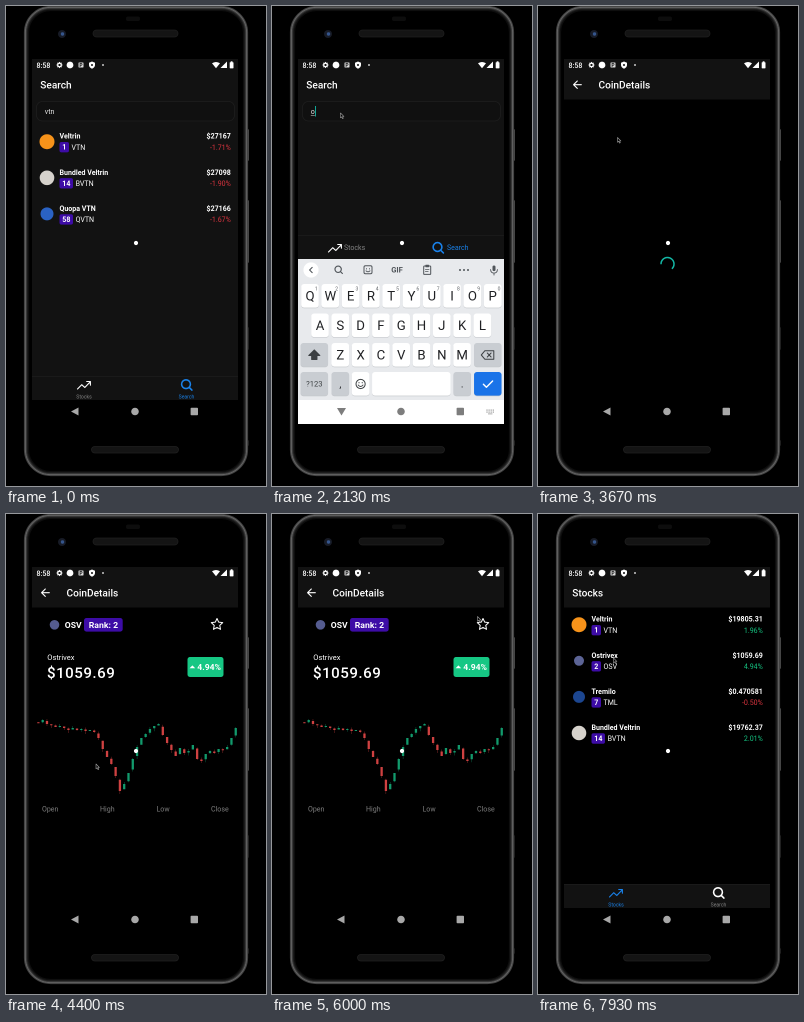
An HTML page with a canvas for the animation above (8 s loop, 260 by 480 pixels).

```html
<!DOCTYPE html>
<html lang="en">
<head>
<meta charset="utf-8">
<title>Coin tracker</title>
<style>
html, body { margin: 0; width: 100%; height: 100%; overflow: hidden; background: #000; }
canvas { display: block; width: 260px; height: 480px; }
</style>
</head>
<body>
<canvas></canvas>
<script>
const LOOP = 8000, W = 260, H = 480;
const CARD = '#121212', BLUE = '#1a82ea', PURPLE = '#3d0ca6', GREEN = '#16c784', RED = '#dd3540', TEAL = '#14b8a6';
const ratio = Math.max(2, window.devicePixelRatio || 1);

function makeContext(canvas) {
  canvas.width = W * ratio;
  canvas.height = H * ratio;
  const c = canvas.getContext('2d');
  c.scale(ratio, ratio);
  return c;
}
const main = makeContext(document.querySelector('canvas'));
const buffer = makeContext(document.createElement('canvas'));
let g = main;

// ---- timing helpers ----
const seg = (t, a, b) => Math.min(1, Math.max(0, (t - a) / (b - a)));
const ease = p => p * p * (3 - 2 * p);
function follow(t, keys) {
  let i = keys.findIndex(k => k[0] > t);
  if (i < 0) i = keys.length - 1;
  const [t0, x0, y0] = keys[i - 1], [t1, x1, y1] = keys[i];
  const p = ease(seg(t, t0, t1));
  return [x0 + (x1 - x0) * p, y0 + (y1 - y0) * p];
}

// ---- drawing helpers ----
function box(x, y, w, h, r, fill, stroke, width = 1) {
  g.beginPath();
  g.roundRect(x, y, w, h, r);
  if (fill) { g.fillStyle = fill; g.fill(); }
  if (stroke) { g.strokeStyle = stroke; g.lineWidth = width; g.stroke(); }
}
const disc = (x, y, r, fill, stroke, width) => box(x - r, y - r, 2 * r, 2 * r, r, fill, stroke, width);
function shape(d, x, y, fill, stroke, width = 1) {
  const path = new Path2D(d);
  g.save();
  g.translate(x, y);
  g.lineJoin = g.lineCap = 'round';
  if (fill) { g.fillStyle = fill; g.fill(path); }
  if (stroke) { g.strokeStyle = stroke; g.lineWidth = width; g.stroke(path); }
  g.restore();
}
function text(s, x, y, size, color = '#fff', weight = 400, align = 'left', spacing = 0) {
  g.font = `${weight} ${size}px Roboto, sans-serif`;
  g.letterSpacing = spacing + 'px';
  g.textAlign = align;
  g.fillStyle = color;
  g.fillText(s, x, y);
  return g.measureText(s).width;
}
function layer(alpha, dy, draw) {
  if (alpha <= 0) return;
  buffer.clearRect(0, 0, W, H);
  g = buffer;
  draw();
  g = main;
  g.globalAlpha = alpha;
  g.drawImage(buffer.canvas, 0, dy, W, H);
  g.globalAlpha = 1;
}

// ---- phone ----
function phone() {
  for (const [y, h] of [[123, 32], [194, 63], [321, 23], [434, 6]]) {
    box(240.3, y, 2.4, h, 1, h > 30 ? '#6a6a6a' : '#2c2c2c');
  }
  box(18.5, 0.5, 223, 469, 26, '#000');
  [64, 100, 58, 30, 14].forEach((v, i) => {
    box(18.5 + i, 0.5 + i, 223 - 2 * i, 469 - 2 * i, 26 - i, null, `rgb(${v},${v},${v})`, 1.2);
  });
  box(120, 10.5, 14, 4.5, 2, '#0d0d0d');
  box(87, 24, 85, 7, 3.5, '#141414', '#1f1f1f', 0.8);
  box(85.5, 440.5, 87, 6.5, 3.2, '#141414', '#202020', 0.8);
  disc(56, 28, 4, '#171b26');
  disc(56.5, 28, 1.7, '#35558c');
}

function statusBar() {
  text('8:58', 30.5, 61.8, 7, '#fff', 500);
  disc(53.5, 59, 1.8, null, '#fff', 1.3);
  for (let i = 0; i < 8; i++) {
    const a = i * Math.PI / 4;
    disc(53.5 + 2.6 * Math.cos(a), 59 + 2.6 * Math.sin(a), 0.5, '#fff');
  }
  disc(64, 59, 3.4, '#fff');
  box(72.5, 56.5, 5, 5, 0.6, '#ddd');
  text('P', 75, 61, 5, CARD, 700, 'center');
  shape('M0-3.5L3-2.3V0Q3 2.6 0 3.7Q-3 2.6-3 0V-2.3Z', 86, 59, '#fff');
  disc(86, 59, 1, CARD);
  disc(97, 59, 0.9, '#fff');
  shape('M-4-2Q0-4.6 4-2L0 3Z', 210, 59.3, '#fff');
  shape('M3-3.5V3H-3.5Z', 218, 59, '#fff');
  box(223.7, 56.2, 3.8, 6.2, 0.6, '#fff');
  box(224.7, 55.3, 1.8, 1.2, 0, '#fff');
}

function navBar() {
  box(26, 394, 207, 24, 0, '#000');
  shape('M3.5-4V4L-4 0Z', 69, 405.5, '#a8a8a8');
  disc(129, 405.5, 3.8, '#a8a8a8');
  box(184.6, 401.8, 7.4, 7.4, 0.8, '#a8a8a8');
}

// ---- app parts ----
const trendIcon = (x, y, color) => shape('M-6.5 4L-2.3-.3L.8 2.5L6.3-3.3M2.7-3.5H6.4V.2', x, y, null, color, 1.1);
function searchIcon(x, y, color, size = 1) {
  disc(x - 0.5 * size, y - 0.5 * size, 4.4 * size, null, color, 1.6 * size);
  shape(`M${2.8 * size} ${2.8 * size}L${5.4 * size} ${5.4 * size}`, x, y, null, color, 1.6 * size);
}
function tabBar(top, active, wide) {
  box(26, top, 207, 24, 0, CARD);
  box(26, top, 207, 0.5, 0, '#222');
  const icon = i => i === active ? BLUE : '#fff', label = i => i === active ? BLUE : '#858585';
  if (wide) {
    trendIcon(63, top + 13, icon(0));
    text('Stocks', 72, top + 15, 7, label(0));
    searchIcon(166, top + 12.5, icon(1));
    text('Search', 175, top + 15, 7, label(1));
  } else {
    trendIcon(78, top + 9, icon(0));
    text('Stocks', 78, top + 22.7, 5.1, label(0), 400, 'center');
    searchIcon(180.5, top + 8.7, icon(1));
    text('Search', 180.5, top + 22.7, 5.1, label(1), 400, 'center');
  }
}
function header(title, x, body) {
  box(26, 53, 207, 365, 0, body);
  box(26, 53, 207, 40.5, 0, CARD);
  statusBar();
  text(title, x, 82.6, 10.1, '#fff', 500);
}
function coinRow([name, ticker, rank, price, change, color, r], y) {
  disc(41, y + 3, r, color);
  text(name, 53.5, y, 7.05, '#fff', 700);
  box(53.5, y + 3.3, String(rank).length * 4 + 5.5, 10.4, 2, PURPLE);
  const w = text(rank, 56.3, y + 11, 7.05, '#fff', 700);
  text(ticker, 61.5 + w, y + 11.2, 7.05);
  text('$' + price, 224.8, y, 7.05, '#fff', 700, 'right');
  text(change.toFixed(2) + '%', 224.8, y + 11.2, 7.05, change < 0 ? RED : GREEN, 400, 'right');
}
const coinList = (rows, y) => rows.forEach((row, i) => coinRow(row, y + i * 36.1));

const veltrinResults = [
  ['Veltrin', 'VTN', 1, '27167', -1.71, '#f7931a', 7.5],
  ['Bundled Veltrin', 'BVTN', 14, '27098', -1.90, '#d6d2cc', 7.3],
  ['Quopa VTN', 'QVTN', 58, '27166', -1.67, '#2a62c4', 6.5],
];
const ostriResults = [
  ['Ostrivex', 'OSV', 2, '1422.93', -0.80, '#565a70', 5],
  ['Dostri', 'DOST', 3, '1.44', -0.59, '#26a17b', 7],
  ['Kavo Pooled Ostri', 'KPOSV', 18, '1331.26', -0.86, '#5cb8ea', 7.5],
  ['Ostrivex Vintage', 'OVV', 30, '20.27', 4.32, '#22803a', 5.5],
  ['Dostri Gilt', 'DOSG', 83, '2678.25', -0.51, '#a88a52', 7],
];
const watchlist = [
  ['Veltrin', 'VTN', 1, '19805.31', 1.96, '#f7931a', 7.5],
  ['Ostrivex', 'OSV', 2, '1059.69', 4.94, '#5c6496', 5],
  ['Tremilo', 'TML', 7, '0.470581', -0.50, '#1c4690', 6],
  ['Bundled Veltrin', 'BVTN', 14, '19762.37', 2.01, '#d6d2cc', 7.3],
];

// ---- screens ----
const keyboardOpen = t => t > 690 && t < 3230;
function query(t) {
  if (t < 1280) return 'vtn';
  return 'ostri'.slice(0, [2050, 2230, 2400, 2560, 2710].filter(at => t >= at).length);
}
function caretOn(t) {
  return keyboardOpen(t) && (t < 900 || (t > 1270 && t < 1470) || t > 1800);
}

function searchScreen(t) {
  header('Search', 34.3, CARD);
  box(30.5, 95.5, 198, 19.5, 6, '#101010', '#1f1f1f', 0.8);
  const typed = query(t), w = text(typed, 38.8, 108, 7.05, '#e8e8e8');
  if (keyboardOpen(t) && typed) box(38.8, 109.4, w, 0.5, 0, '#ddd');
  if (caretOn(t)) box(39 + w, 100, 0.9, 10.5, 0, TEAL);
  if (t < 1280) coinList(veltrinResults, 132.7);
  else if (t > 2750) {
    g.save();
    g.beginPath();
    g.rect(26, 116, 207, keyboardOpen(t) ? 113 : 254);
    g.clip();
    coinList(ostriResults, 132.7);
    g.restore();
  }
  tabBar(keyboardOpen(t) ? 229 : 370, 1, t > 690 && t < 3700);
}

function stocksScreen() {
  header('Stocks', 34.3, '#000');
  coinList(watchlist, 107.7);
  tabBar(370, 0, false);
}

const levels = [208, 209, 206, 210, 211, 213, 212, 214, 216, 214, 216, 215, 217, 216, 218, 224, 235, 243, 250, 262, 277, 270, 259,
  245, 233, 224, 220, 215, 212, 210, 221, 229, 236, 242, 234, 239, 237, 231, 245, 247, 240, 237, 239, 235, 236, 233, 224, 214];
const STEP = 4.29, FIRST = 32.4;
const candles = levels.slice(1).map((close, i) => {
  const open = levels[i] + (close - levels[i]) * 0.25;
  const top = Math.min(open, close), bottom = Math.max(open, close);
  return { x: FIRST + i * STEP, open, close, high: top - i * 7 % 3, low: bottom + i * 5 % 4 };
});
const priceAt = y => '$' + (1059.69 + (214 - y) * 0.55).toFixed(2);

function chart(t, [mx, my]) {
  for (const c of candles) {
    const color = c.close < c.open ? '#129a6c' : '#cf4141';
    box(c.x - 0.15, c.high, 0.3, c.low - c.high, 0, color);
    box(c.x - 1.15, Math.min(c.open, c.close), 2.3, Math.max(1, Math.abs(c.open - c.close)), 0, color);
  }
  const active = t > 4500 && t < 5820;
  const i = Math.min(candles.length - 1, Math.max(0, Math.round((mx - FIRST) / STEP)));
  const c = candles[i];
  ['Open', 'High', 'Low', 'Close'].forEach((name, k) => {
    const x = [36, 94, 150.5, 205][k];
    text(name, x, 297.6, 7.05, '#808080');
    if (active) text(priceAt(c[name.toLowerCase()]), x - (k === 3 ? 4 : 0), 306.5, 7.05);
  });
  if (!active) return;
  text(`10/${8 + (i >> 2)}/2022, ${8 + i % 4}:30:00 AM`, 31, 322, 7.05, '#fff', 700);
  const y = Math.min(288, Math.max(190, my));
  g.setLineDash([1.5, 1.5]);
  shape(`M26 ${y}H233M${c.x} 187V290`, 0, 0, null, '#888', 0.6);
  g.setLineDash([]);
  const left = mx > 130 ? 31 : 196;
  box(left, y - 5.5, 32, 11, 2, '#fff');
  text(priceAt(y), left + 16, y + 2.4, 6.6, '#111', 400, 'center');
}

const STAR = 'M' + Array.from({ length: 10 }, (_, i) => {
  const a = i * Math.PI / 5, r = i % 2 ? 2.9 : 6;
  return [(r * Math.sin(a)).toFixed(2), (-r * Math.cos(a)).toFixed(2)];
}).join('L') + 'Z';

function detailScreen(t, pointer) {
  header('CoinDetails', 60.5, '#000');
  shape('M4 0H-3.5M0-3.7L-3.7 0L0 3.7', 39.3, 78.7, null, '#fff', 1.1);
  if (t < 4040) {
    const a = t / 130;
    g.beginPath();
    g.arc(129.5, 258, 6.5, a, a + 4);
    g.strokeStyle = TEAL;
    g.lineWidth = 1.5;
    g.stroke();
    return;
  }
  disc(48.5, 110.8, 4.8, '#555c90');
  text('OSV', 58.8, 114, 8.6, '#fff', 700);
  box(78, 104, 38.7, 13.6, 2.5, PURPLE);
  text('Rank: 2', 97.4, 114, 8.7, '#fff', 700, 'center');
  const saved = t > 6150;
  shape(STAR, 211, 110.5, saved ? '#ffbf00' : null, saved ? '#ffbf00' : '#fff', 1);
  text('Ostrivex', 41.3, 146, 7.5);
  text('$1059.69', 41, 164, 15.1, '#fff', 500, 'left', 0.5);
  box(181.5, 143, 36, 20, 2.5, GREEN);
  shape('M-2.8 1.3L0-1.6L2.8 1.3Z', 186.4, 153, '#fff');
  text('4.94%', 191.3, 156.2, 8.6, '#fff', 700);
  chart(t, pointer);
}

// ---- keyboard ----
function key(x, y, w, label, fill = '#fff', size = 13.2, color = '#202124') {
  box(x - w / 2, y - 11.4, w, 23.6, 2.8, '#c4c7cb');
  box(x - w / 2, y - 12, w, 23.6, 2.8, fill);
  text(label, x, y + size * 0.35, size, color, 400, 'center');
}
function suggestionStrip(t, upper) {
  const ink = '#50555a';
  disc(39, 264, 7.6, '#fff');
  shape(upper ? 'M1.2-2.6L-1.4 0L1.2 2.6' : 'M-1.2-2.6L1.4 0L-1.2 2.6', 39, 264, null, ink, 1.1);
  box(220.5, 259.5, 3, 5.6, 1.5, ink);
  shape('M-3.4 0Q-3.2 3.5 0 3.5Q3.2 3.5 3.4 0M0 3.5V5.4', 222, 263.6, null, ink, 0.9);
  if (upper) {
    searchIcon(66.5, 263.6, ink, 0.72);
    box(92, 259.8, 8, 8, 1.5, null, ink);
    shape('M-2 1Q0 3 2 1M-1.5-1.2V-.8M1.5-1.2V-.8', 96, 263.8, null, ink, 0.9);
    text('GIF', 125, 266.7, 7.6, ink, 700, 'center');
    box(151.7, 260, 7, 8.4, 0.8, null, ink);
    box(153.4, 258.8, 3.6, 2.4, 0.5, ink);
    shape('M-1.8 0H1.8M-1.8 2H1', 155.2, 263.6, null, ink, 0.8);
    [188, 192, 196].forEach(x => disc(x, 264, 1, ink));
  } else if (t < 3230) {
    const words = t < 1280 ? ['vtn', 'velt', 'VTN'] : [query(t), 'ostrich', 'ostriches'];
    words.forEach((word, i) => text(word, 71 + i * 57, 267.3, 9.4, ink, 400, 'center'));
    box(99, 258, 0.6, 12, 0, '#c8cbcf');
    box(156, 258, 0.6, 12, 0, '#c8cbcf');
  }
}
function keyboard(t) {
  const upper = t > 1280 && t < 2200, grey = '#c9cdd2', ink = '#3c4043';
  box(26, 253, 207, 165, 0, '#e8eaed');
  suggestionStrip(t, upper);
  [['qwertyuiop', 38, 290], ['asdfghjkl', 48, 319.5], ['zxcvbnm', 68.3, 349]].forEach(([letters, x, y], row) => {
    [...(upper ? letters.toUpperCase() : letters)].forEach((ch, i) => {
      key(x + i * 20.3, y, 17.6, ch);
      if (!row) text((i + 1) % 10, x + 6.3 + i * 20.3, y - 5.5, 5, '#5f6368', 400, 'center');
    });
  });
  key(42.3, 349, 27.5, '', grey);
  shape('M0-5L5.5.5H2.6V4.5H-2.6V.5H-5.5Z', 42.3, 349, upper ? ink : null, ink, 1.1);
  key(215.8, 349, 27.5, '', grey);
  shape('M-6.5 0L-3-4.2H6V4.2H-3ZM-.5-2L3.3 2M3.3-2L-.5 2', 215.8, 349, null, ink, 1);
  key(42.3, 378, 27.5, '?123', grey, 7.6, ink);
  key(68.3, 378, 17.6, ',', grey, 10);
  key(88.6, 378, 17.6, '');
  disc(88.6, 378, 4.6, null, ink, 1);
  shape('M-2.4 1Q0 4 2.4 1M-1.6-1.5V-1.1M1.6-1.5V-1.1', 88.6, 378, null, ink, 1);
  key(139.3, 378, 78.5, '');
  key(190.2, 378, 17.6, '.', grey, 10);
  key(215.8, 378, 27.5, '', '#1a73e8');
  shape('M-4.4.2L-1.4 3.2L4.8-3', 215.8, 378, null, '#fff', 1.4);
  box(26, 394, 207, 24, 0, '#fff');
  shape('M-4.5-3.5H4.5L0 4Z', 69.5, 405.5, '#7d7d7d');
  disc(129, 405.5, 3.8, '#7d7d7d');
  box(184.6, 401.8, 7.4, 7.4, 0.8, '#7d7d7d');
  for (let i = 0; i < 8; i++) box(214.4 + i % 4 * 2.1, 403.5 + (i >> 2) * 2, 1.2, 1.2, 0, '#999');
  box(216, 407.5, 4.4, 0.8, 0, '#999');
}

// ---- pointer: time, x, y ----
const pointerKeys = [
  [0, 128, 426], [400, 128, 426], [620, 68.5, 107], [2870, 68.5, 107], [3150, 79.5, 131.5],
  [3740, 79.5, 131.5], [3960, 90, 250], [4470, 90, 250], [4880, 138, 216], [5320, 196, 232],
  [5740, 208, 116], [5920, 205.5, 102.5], [6240, 205.5, 102.5], [6580, 39, 77], [7230, 39, 77],
  [7490, 78, 377], [7570, 78, 377], [7900, 75.5, 144], [8000, 75.5, 144],
];

function render(t) {
  main.clearRect(0, 0, W, H);
  phone();
  const pointer = follow(t, pointerKeys);
  g.save();
  g.beginPath();
  g.rect(26, 53, 206, 365);
  g.clip();
  if (t < 7530) searchScreen(t);
  else stocksScreen();
  const detail = ease(seg(t, 3490, 3660)) * (1 - ease(seg(t, 6730, 6930)));
  layer(detail, 12 * (1 - detail), () => detailScreen(t, pointer));
  navBar();
  const hidden = t < 2000 ? 1 - ease(seg(t, 660, 860)) : seg(t, 3230, 3530);
  layer(1 - 1.65 * hidden, 165 * hidden, () => keyboard(t));
  g.restore();
  disc(130, 237, 2.1, '#fff');
  if (t >= 400) shape('M0 0V4.8L1.1 3.8L2 5.6L2.8 5.2L2 3.5H3.4Z', ...pointer, '#000', '#a0a0a0', 0.6);
}

function tick(now) {
  render(now % LOOP);
  requestAnimationFrame(tick);
}
requestAnimationFrame(tick);
</script>
</body>
</html>
```
